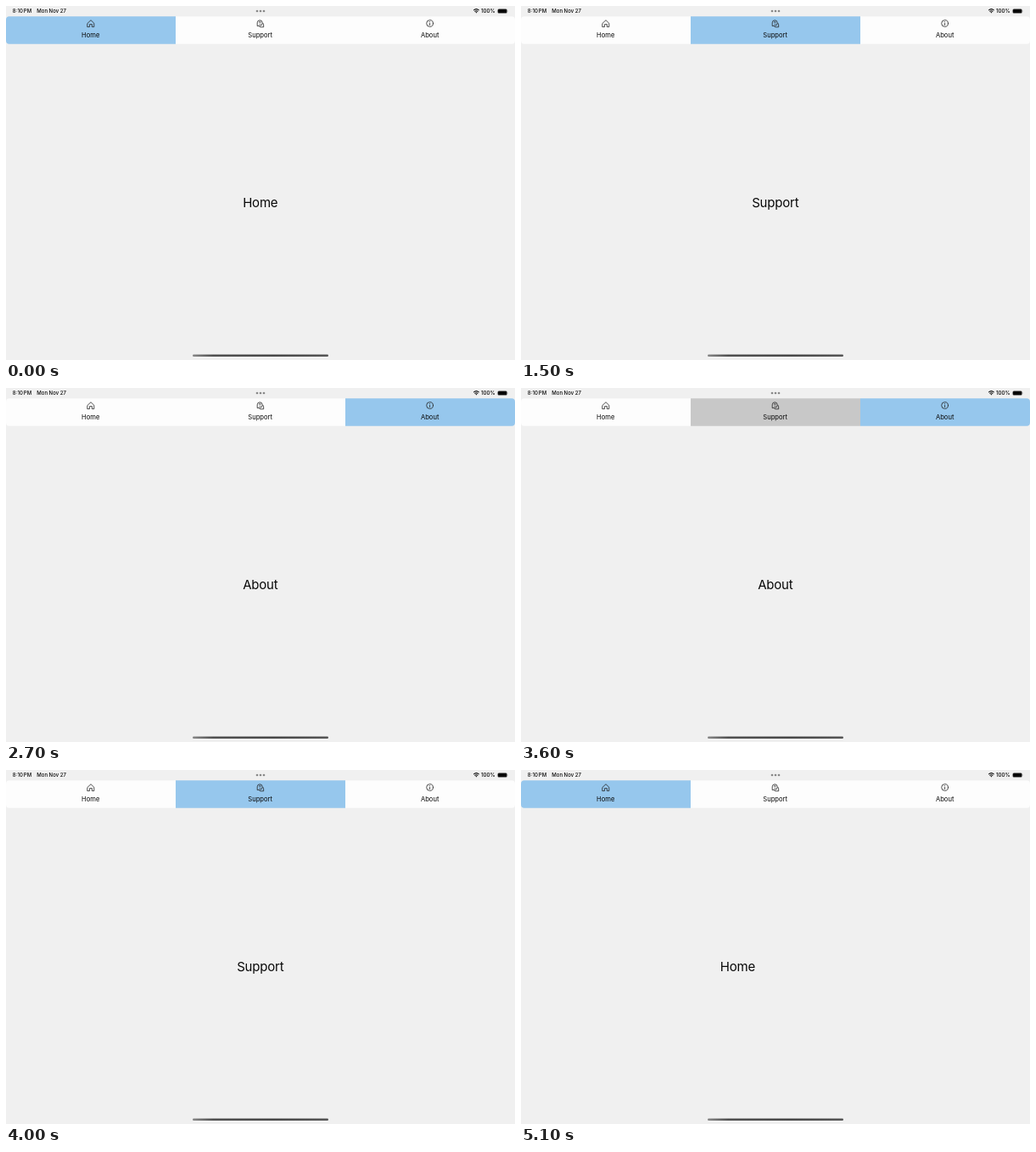
Recreate the animation shown at these times as an HTML page. Size 600 by 417 pixels, loop 5.2 s.

```html
<!DOCTYPE html>
<html lang="en">
<head>
<meta charset="utf-8">
<title>Tabs</title>
<style>
  html, body { margin: 0; width: 100%; height: 100%; overflow: hidden; background: #f0f0f0; }
  svg { display: block; width: 100vw; height: 100vh; }
  text { font-family: Inter, Roboto, "Liberation Sans", sans-serif; fill: #080808; }
  .status { font-size: 6px; font-weight: 500; }
  .label { font-size: 7.6px; text-anchor: middle; }
  .page { font-size: 15px; letter-spacing: -.2px; text-anchor: middle; }
  .icon { fill: none; stroke: #222; stroke-width: .8; stroke-linecap: round; stroke-linejoin: round; }
</style>
</head>
<body>
<svg viewBox="0 0 600 417">
  <defs>
    <clipPath id="bar"><rect y="12.2" width="600" height="32.5" rx="4"/></clipPath>
    <linearGradient id="grip">
      <stop offset="0" stop-color="#888"/>
      <stop offset=".15" stop-color="#505050"/>
      <stop offset=".6" stop-color="#484848"/>
      <stop offset="1" stop-color="#555"/>
    </linearGradient>
  </defs>
  <rect width="600" height="417" fill="#f0f0f0"/>

  <g class="status">
    <text x="7.8" y="8.1">8:10&#8201;PM</text>
    <text x="36.3" y="8.1">Mon Nov 27</text>
    <text x="560" y="8.1" font-size="6.2">100%</text>
  </g>
  <g fill="#888">
    <circle cx="296" cy="6" r="1.35"/><circle cx="300" cy="6" r="1.35"/><circle cx="304" cy="6" r="1.35"/>
  </g>
  <g fill="none" stroke="#080808" stroke-width="1.1">
    <path d="M551.2 5.1Q554.4 2.2 557.6 5.1M552.5 6.6Q554.4 4.9 556.3 6.6"/>
    <path d="M553.4 7.3Q554.4 6.5 555.4 7.3L554.4 8.5Z" fill="#080808" stroke="none"/>
  </g>
  <rect x="579.6" y="3.4" width="11" height="5.2" rx="1.5" fill="#080808" stroke="#aaa" stroke-width=".4"/>
  <path d="M591.3 5V7Q592.3 6 591.3 5Z" fill="#888"/>

  <g id="tabs" clip-path="url(#bar)"></g>

  <g class="icon">
    <path d="M96.2 20.3L100 16.7L103.8 20.3V24.6H101.4V21.6H98.6V24.6H96.2Z"/>
    <path d="M296.2 23.2V19.8A3 3 0 0 1 302.2 19.8V20A3 3 0 0 1 299.2 23.2Z"/>
    <path d="M303 20.2Q304 21 303.7 24.8H300.2Q298.7 24.7 298.2 23.8"/>
    <path d="M298.3 19.2Q298.4 18.3 299.3 18.3T300.2 19.2Q300.1 19.8 299.3 20.3M299.3 21.6V21.7" stroke-width=".7"/>
    <circle cx="499.6" cy="20.5" r="3.9"/>
    <path d="M499.6 20.2V22.5M499.6 18.5V18.6"/>
  </g>

  <g id="labels"></g>
  <g id="pages"></g>
  <rect x="220" y="410.4" width="160" height="2.6" rx="1.3" fill="url(#grip)"/>
</svg>
<script>
const NAMES = ["Home", "Support", "About"];
const LOOP = 5200, STEP = 100;
const COLORS = { idle: "#fdfdfd", pressed: "#c8c8c8", selected: "#96c7ed" };
const TAPS = [
  { at: 1100, from: 0, to: 1 },
  { at: 2300, from: 1, to: 2 },
  { at: 3600, from: 2, to: 1 },
  { at: 4800, from: 1, to: 0 }
];

function add(parent, tag, attrs, text = "") {
  const node = document.createElementNS("http://www.w3.org/2000/svg", tag);
  for (const key in attrs) node.setAttribute(key, attrs[key]);
  node.textContent = text;
  return document.getElementById(parent).appendChild(node);
}

const tabs = NAMES.map((_, i) => add("tabs", "rect", { x: i * 200, y: 12, width: 200, height: 33 }));
NAMES.forEach((name, i) => add("labels", "text", { class: "label", x: 99.7 + i * 200, y: 36.9 }, name));
const pages = NAMES.map(name => add("pages", "text", { class: "page", y: 236.6 }, name));

// The slide starts shortly after release and eases in and out.
function slide(elapsed) {
  const t = Math.min(1, Math.max(0, (elapsed - 18) / 342));
  return (1 - Math.cos(Math.PI * t)) / 2;
}

function draw(ms) {
  const time = Math.floor((ms % LOOP) / STEP) * STEP;
  const tap = TAPS.findLast(t => t.at <= time) || { at: -LOOP, from: 1, to: 0 };
  const elapsed = time - tap.at;
  const pressing = elapsed < STEP;
  const active = pressing ? tap.from : tap.to;
  const progress = pressing ? 0 : slide(elapsed);
  const direction = Math.sign(tap.to - tap.from);

  tabs.forEach((tab, i) => {
    const state = i === active ? "selected" : pressing && i === tap.to ? "pressed" : "idle";
    tab.setAttribute("fill", COLORS[state]);
  });
  pages.forEach((page, i) => {
    const offset = i === tap.to ? direction * (1 - progress) : -direction * progress;
    const shown = (i === tap.to || i === tap.from) && Math.abs(offset) < 1;
    page.setAttribute("visibility", shown ? "visible" : "hidden");
    page.setAttribute("x", 299.8 + 600 * offset);
  });
}

const start = performance.now();
function tick() {
  draw(performance.now() - start);
  requestAnimationFrame(tick);
}
tick();
</script>
</body>
</html>
```
